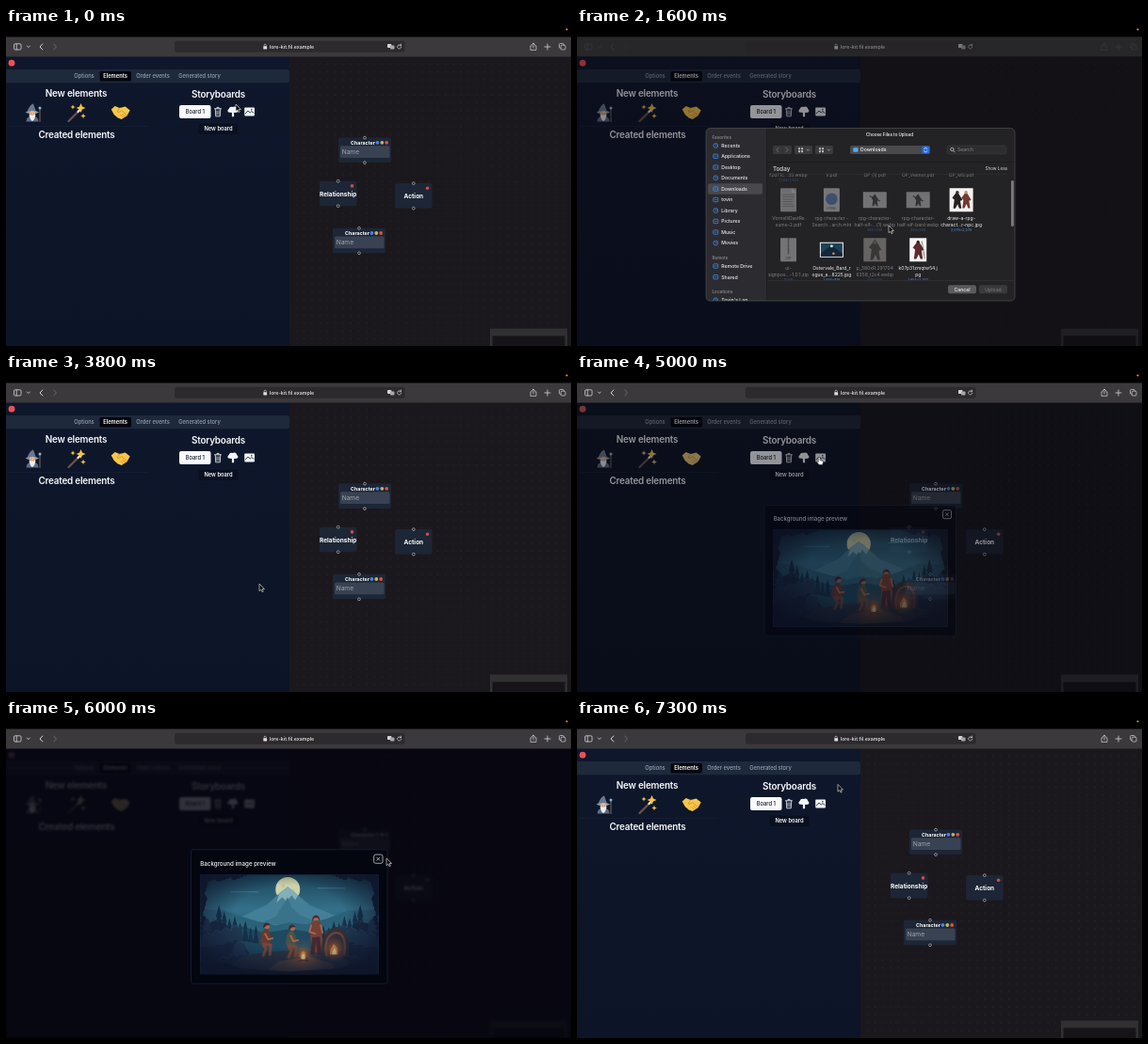
Recreate the animation shown at these times as an HTML page. Size 600 px wide and 338 px high, loop 7400 ms.

```html
<!DOCTYPE html>
<html lang="en">
<head>
<meta charset="utf-8">
<title>Story editor</title>
<style>
html,body{margin:0;width:100%;height:100%;overflow:hidden;background:#000}
svg{display:block;width:100vw;height:100vh;font-family:Inter,"Open Sans",sans-serif}
</style>
</head>
<body>
<svg id="stage" viewBox="0 0 600 338" xmlns="http://www.w3.org/2000/svg"></svg>
<script>
const LOOP = 7400, STEP = 100;

// Markup helpers
const rect = (x, y, w, h, fill, rx = 0, more = '') =>
  `<rect x="${x}" y="${y}" width="${w}" height="${h}" fill="${fill}" rx="${rx}" ${more}/>`;
const dot = (x, y, r, fill, more = '') => `<circle cx="${x}" cy="${y}" r="${r}" fill="${fill}" ${more}/>`;
const shape = (d, fill, more = '') => `<path d="${d}" fill="${fill}" ${more}/>`;
const line = (d, color, w = 0.8, more = '') =>
  `<path d="${d}" fill="none" stroke="${color}" stroke-width="${w}" stroke-linecap="round" stroke-linejoin="round" ${more}/>`;
// y is the middle of the capitals
const text = (x, y, s, size, fill = '#fff', weight = 400, anchor = 'middle', more = '') =>
  `<text x="${x}" y="${y + size * 0.36}" font-size="${size}" fill="${fill}" font-weight="${weight}" text-anchor="${anchor}" ${more}>${s}</text>`;
const at = (x, y, body, more = '') => `<g transform="translate(${x} ${y})" ${more}>${body}</g>`;

const defs = `<defs>
  <pattern id="dots" x="304" y="34" width="8.35" height="8.35" patternUnits="userSpaceOnUse">${dot(4, 4, 0.45, '#38343b')}</pattern>
  <linearGradient id="panel" x2="0" y2="1"><stop stop-color="#0e172b"/><stop offset="1" stop-color="#0c1427"/></linearGradient>
  <linearGradient id="sky" x2="0" y2="1"><stop stop-color="#1c4459"/><stop offset=".35" stop-color="#34708a"/><stop offset=".7" stop-color="#24566c"/></linearGradient>
  <radialGradient id="glow"><stop stop-color="#f0933c" stop-opacity=".65"/><stop offset="1" stop-color="#c4622a" stop-opacity="0"/></radialGradient>
  <radialGradient id="edge" cy=".42" r=".62"><stop offset=".5" stop-color="#0d1529" stop-opacity="0"/><stop offset="1" stop-color="#0d1529" stop-opacity=".85"/></radialGradient>
  <clipPath id="below"><rect y="30" width="600" height="308"/></clipPath>
  <clipPath id="sheetClip"><rect x="137" y="106.5" width="328" height="183.5" rx="4.5"/></clipPath>
  <clipPath id="listClip"><rect x="202" y="154.5" width="258" height="113.5"/></clipPath>
  <clipPath id="artClip"><rect width="189.5" height="106"/></clipPath>
</defs>`;

function toolbar() {
  const c = '#d6d4d6';
  return rect(0, 0, 600, 10, '#000') + rect(0, 9.5, 600, 21, '#3b393b') +
    dot(595.5, 1.5, 1.1, '#e39a2d') +
    `<g id="tools">` + rect(179, 13.8, 244.5, 12, '#2c2a2c', 2.5) +
    rect(8.5, 16.8, 7.5, 6.2, 'none', 1.2, `stroke="${c}" stroke-width=".8"`) + line('M11.2 17v6', c) +
    line('M22.3 19l1.5 1.6 1.5-1.6', c) + line('M38.8 17l-2.8 3 2.8 3', c, 1) +
    line('M50.8 17l2.6 3-2.6 3', '#69676a', 1) +
    line('M558.2 18.8h-1.2v4.6h6v-4.6h-1.2M560 21v-4.8M558.4 17.6l1.6-1.5 1.6 1.5', c, 0.7) +
    line('M575 17v6M572 20h6', c) +
    rect(587.5, 16.5, 4.8, 4.8, 'none', 1, `stroke="${c}" stroke-width=".7"`) +
    rect(589.2, 18.2, 4.8, 4.8, '#3b393b', 1, `stroke="${c}" stroke-width=".7"`) + `</g>` +
    `<g id="address">` + rect(273.3, 19.3, 3.8, 3.3, '#dedede', 0.6) + line('M274.1 19.3v-1a1.1 1.1 0 0 1 2.2 0v1', '#dedede', 0.6) +
    text(279.8, 20.1, 'lore-kit.fil.example', 5.3, '#eeedee', 500, 'start') +
    rect(405, 17, 4.4, 4, '#d4d2d4', 0.8) + rect(408, 18.6, 4.5, 4, '#a9a7aa', 0.8) +
    line('M419.4 18.6a2.1 2.1 0 1 0 .4 1.8M419.6 17v1.8h-1.8', c, 0.7) + `</g>`;
}

const wizard = shape('M-5.5-1C-4-6-1-9 1-9.5L4-1z', '#687890') + shape('M-7.5-.2C-5-3 5-3 7-.2L4 1h-8z', '#8796aa') +
  dot(0, 1.5, 3.2, '#e9b98f') + shape('M-6.5 9.5C-6 4-3 4 0 4s6 0 6.5 5.5z', '#5c6d89') +
  shape('M-3.4 2C-2 3 2 3 3.4 2C3.2 5 2 8 0 9C-2 8-3.2 5-3.4 2z', '#eceef0') +
  line('M8-4V9.5', '#8a6848', 1) + dot(8, -5, 1.5, '#8cb6d9') + dot(-1.2, 1, 0.4, '#333') + dot(1.2, 1, 0.4, '#333');
const spark = (x, y, r) => at(x, y, shape(`M0-${r}L${r * 0.3}-${r * 0.3} ${r} 0 ${r * 0.3} ${r * 0.3} 0 ${r}-${r * 0.3} ${r * 0.3}-${r} 0-${r * 0.3}-${r * 0.3}z`, '#f6c343'));
const wand = line('M-8.5 9L3.5-3', '#6e5148', 2.3) + line('M1.5-1L4-3.5', '#efe6dc', 2.3) +
  spark(4.5, -5, 5) + spark(-4, -6, 2.6) + spark(7, 3.5, 2.8);
const shake = shape('M-10-3L-6-6.5-1-4.5 5-6 10-2 7 3.5 1 7.5-3 6-7 2.5z', '#f6c64b') +
  line('M-1-4.5L-3.5-.5c1.8 1 3.3 0 4.5-1.4L7 3.5M3 6l-3-3M5 4.8L2 1.8', '#c88f28', 0.8);

const handles = h => [0, h].map(y => dot(0, y, 1.4, '#111', 'stroke="#d8d8dc" stroke-width=".6"')).join('');
const character = (x, y) => at(x, y, rect(-28, 0, 56, 26.5, '#1d2636', 2) +
  text(-2, 5, 'Character', 5.3, '#fff', 700) +
  ['#3f86ee', '#c3b465', '#db543f'].map((c, i) => dot(13.4 + i * 4.9, 5.2, 1.9, c)).join('') +
  rect(-26, 8.6, 52.5, 12.8, '#384252', 1.5) + text(-24.3, 15, 'Name', 6.6, '#a0a6b0', 400, 'start') + handles(26.5));
const plainNode = (x, y, name) => at(x, y, rect(-19.7, 0, 39.4, 26.5, '#1d2636', 2.5) + dot(14.8, 5.2, 1.8, '#cf4d44') +
  text(0, 13.6, name, 6.5, '#fff', 700) + handles(26.5));

function page() {
  const head = (x, y, s) => text(x, y, s, 9.9, '#f8fafc', 600, 'middle', 'letter-spacing="-.2"');
  const tab = (x, s) => text(x, 51.2, s, 5.75, '#94a3b8', 500);
  return rect(0, 30, 301, 308, 'url(#panel)') + rect(301, 30, 299, 308, '#1b181d') + rect(301, 30, 299, 308, 'url(#dots)') +
    dot(6, 37.2, 3.4, '#ee5055') +
    rect(-3, 44, 304, 14.3, '#1e293b', 2.5) + rect(99.5, 46, 33.5, 10.6, '#02050d', 1.5) +
    tab(83, 'Options') + text(116, 51.2, 'Elements', 5.75, '#fff', 600) + tab(156, 'Order events') + tab(205.5, 'Generated story') +
    head(74.5, 69, 'New elements') + head(225.5, 70.3, 'Storyboards') + head(75, 113.3, 'Created elements') +
    at(28, 90, wizard) + at(75, 90, wand) + at(121.7, 89.5, shake) +
    rect(3, 104.3, 147, 0.5, '#1a2438') +
    rect(184, 82, 33.5, 14, '#f8fafc', 2) + text(200.8, 89, 'Board 1', 5.75, '#111827', 500) +
    line('M221.5 85.8h7M224 85.6v-1.2h2v1.2M222.3 86l.4 7.8h4.6l.4-7.8M224 88v4M226 88v4', '#f1f5f9', 0.8) +
    shape('M236 89.5a2.2 2.2 0 0 1 .7-3.5a3 3 0 0 1 4-2a3 3 0 0 1 4.6 2.2a2 2 0 0 1 0 3.6l-3.2.3v4.2h-2.2v-4.2z', '#f1f5f9') +
    rect(253.2, 84.6, 10.8, 8.8, '#f1f5f9', 0.8) + line('M254.2 91l2.8-3 2.2 2 1.6-1.4 2.3 1.6', '#1e293b', 0.9) + dot(260.8, 86.8, 0.8, '#1e293b') +
    rect(204, 101, 43, 12.4, '#0a1020', 2, 'stroke="#131d31" stroke-width=".5"') + text(225.5, 107.2, 'New board', 5.75, '#f8fafc', 600) +
    character(381, 116.6) + character(375, 212.8) + plainNode(352.7, 162.7, 'Relationship') + plainNode(432.8, 165.1, 'Action') +
    rect(514, 319.5, 82, 18.5, '#303033') + rect(516.5, 327.3, 77, 10.7, '#161418');
}

// File icons, centred on 0,0
const sheetIcon = rect(-8.5, -12.5, 17, 25, '#c9c9cb', 1) + shape('M3.5-12.5l5 5h-5z', '#f2f2f4') +
  [-6, -3.5, -1, 1.5, 4, 6.5].map(y => rect(-6, y, 12 - Math.abs(y) % 3, 0.8, '#8c8c90')).join('');
const bookIcon = sheetIcon + rect(-8.5, -12.5, 1.6, 25, '#77777c');
const webIcon = rect(-8.5, -12.5, 17, 25, '#dcdce0', 1) + dot(0, -1, 6.3, '#5b86c6') + text(0, 9, 'HTML', 3.6, '#777', 600);
const zipIcon = rect(-8.5, -12.5, 17, 25, '#d4d4d7', 1) + line('M0-12V4', '#77777b', 1.6, 'stroke-dasharray="1 1.6"') + text(0, 9, 'ZIP', 3.8, '#777', 600);
const figure = (x, c, s = 1) => at(x, 0, shape(`M0-${8 * s}l${2 * s} ${3 * s} ${3 * s} ${5 * s}-${2 * s} 1 ${s} ${7 * s}h-${2 * s}l-${1.5 * s}-${4 * s}-${2 * s} ${4 * s}h-${2 * s}l${s}-${8 * s}-${2 * s}-2 ${3 * s}-${4 * s}z`, c));
const portrait = rect(-12.5, -12.5, 25, 25, '#d8d8d8') + rect(-11.5, -11.5, 23, 23, '#7b5b41') + dot(0, -3, 5, '#be8d64') + shape('M-9 11.5C-8 3 8 3 9 11.5z', '#47372f') + shape('M-6-4C-5-11 5-11 6-4L3-6h-6z', '#523324');
const wide = rect(-12.5, -8.5, 25, 17, '#d2d2d4') + figure(0, '#444', 0.8) + line('M-5-4l10 5', '#444', 1.2);
const cast = rect(-12.5, -12.5, 25, 25, '#f5f3f1') + figure(-4.5, '#262022', 1.15) + figure(5, '#713a30', 1.1) + dot(-4.2, -8, 1.8, '#40302c') + dot(5, -8, 1.7, '#c28868');
const statue = rect(-12, -12.5, 24, 25, '#b9b4ae') + figure(0, '#56514e', 1.4) + dot(0, -8, 2.2, '#837c76');
const rogue = rect(-9, -12.5, 18, 25, '#f6f5f4') + figure(0, '#5b2a2c', 1.25) + dot(0, -8.5, 1.6, '#392124') + line('M4-9L7 9', '#555', 0.7);
const camp = rect(-12.5, -8, 25, 16, '#f4f4f4') + rect(-11.5, -7, 23, 14, '#1d4257') + shape('M-11.5 4L-4-2 0-5 5-1 11.5 4V7h-23z', '#12263b') + dot(0, -4, 1.6, '#c7d4bd') + dot(2, 4, 1.3, '#e08a3a');

const FILES = [
  [portrait, '4e7b1d903c5826', 'f2d71c...35.webp', '1,024×1,024'], [sheetIcon, 'TovinMarwell_C', 'V.pdf'],
  [bookIcon, 'TovinMarwell_S', 'OP (1).pdf'], [bookIcon, 'TovinMarwell_S', 'OP_Velmor.pdf'], [bookIcon, 'TovinMarwell_S', 'OP_MS.pdf'],
  [sheetIcon, 'VornelliDastRe', 'sume-2.pdf'], [webIcon, 'rpg character -', 'Search...arch.mht'],
  [wide, 'rpg-character-', 'half-elf-...(1).webp', '960×539'], [wide, 'rpg-character-', 'half-elf-bard.webp', '960×539'],
  [cast, 'draw-a-rpg-', 'charact...r-npc.jpg', '2,576×2,576', 1],
  [zipIcon, 'ui-', 'signpos...-1.0.1.zip', '51 KB'], [camp, 'Ostervale_Bard_r', 'ogue_a...8225.jpg', '1,456×816', 1],
  [statue, 'p_380xR.291704', '6358_t2c4.webp', '570×570'], [rogue, 'k07p31zmqtw54.j', 'pg', '1,654×2,362', 1]
];
function file([icon, a, b, size, live], i) {
  const picked = i === 11
    ? `<g class="picked">${rect(-15.5, -15, 31, 29, '#4a494c', 2)}${rect(-23, 15.2, 46, 15.4, '#1d58d6', 1.5)}</g>` : '';
  return at(224.5 + i % 5 * 45.9, 175 + Math.floor(i / 5) * 53, picked + icon +
    text(0, 19, a, 5, '#f1f1f2', 400) + text(0, 26.4, b, 5, '#f1f1f2', 400) +
    (size ? text(0, 32.2, size, 3.7, '#4d91de') : ''), live ? '' : 'opacity=".45"');
}

function sheet() {
  const side = [[125, 'Recents'], [136.3, 'Applications'], [148, 'Desktop'], [159.3, 'Documents'], [171, 'Downloads'], [182.5, 'tovin'],
    [194, 'Library'], [205.5, 'Pictures'], [217, 'Music'], [228.5, 'Movies'], [253, 'Remote Drive'], [264.7, 'Shared'], [289.3, 'Tovin\'s Lap']];
  const group = (y, s) => text(143.5, y, s, 4.6, '#858388', 600, 'start');
  const icon = (y, i) => (i % 3 ? rect(144.8, y - 2.2, 5, 4.4, 'none', 0.9, 'stroke="#3f8ff0" stroke-width=".8"') + line(`M146 ${y}h2.5`, '#3f8ff0', 0.6)
    : dot(147.3, y, 2.4, 'none', 'stroke="#3f8ff0" stroke-width=".8"') + line(`M147.3 ${y - 1.2}v1.3h1`, '#3f8ff0', 0.6));
  const drop = x => rect(x, 125, 19, 9, '#3b3a3d', 1.6) + rect(x + 4, 127.3, 2, 2, '#bbb') + rect(x + 7, 127.3, 2, 2, '#bbb') +
    rect(x + 4, 130.2, 2, 2, '#bbb') + rect(x + 7, 130.2, 2, 2, '#bbb') + line(`M${x + 13} 129l1.3 1.4 1.3-1.4`, '#bbb', 0.7);
  return `<g clip-path="url(#sheetClip)">` + rect(137, 106, 328, 185, '#232225') + rect(137, 106, 64.5, 185, '#2c2b2f') +
    rect(201.3, 106, 0.5, 185, '#141315') + rect(139, 165.2, 58, 11.6, '#49484c', 2) +
    group(116, 'Favorites') + group(244, 'Remote') + group(280, 'Locations') +
    side.map(([y, s], i) => icon(y, i) + text(153.3, y, s, 5.15, '#ececee', 500, 'start')).join('') +
    text(332, 113.6, 'Choose Files to Upload', 4.5, '#e6e5e7', 600) +
    rect(208, 125, 20, 9, '#38373a', 1.6) + rect(217.8, 126, 0.4, 7, '#232225') + line('M213.6 127.5l-1.7 2 1.7 2M222.3 127.5l1.7 2-1.7 2', '#77767a', 0.8) +
    drop(231) + drop(253) +
    rect(290, 125, 85, 9, '#4a494d', 1.8) + rect(366.5, 125.6, 7.6, 7.8, '#2c6be0', 1.6) + line('M368.8 128.6l1.5-1.6 1.5 1.6M368.8 130.6l1.5 1.6 1.5-1.6', '#fff', 0.7) +
    rect(293.3, 127.3, 5.2, 4.5, '#55aaf0', 0.8) + text(301, 129.5, 'Downloads', 5.15, '#f0f0f1', 500, 'start') +
    rect(393, 125, 63, 9, '#2d2c2f', 1.8, 'stroke="#3f3e42" stroke-width=".5"') + dot(398.4, 129, 1.7, 'none', 'stroke="#c8c8ca" stroke-width=".8"') +
    line('M399.7 130.4l1.4 1.4', '#c8c8ca') + text(404, 129.5, 'Search', 5.15, '#89888c', 400, 'start') +
    rect(202, 142.2, 263, 0.5, '#151416') +
    `<g clip-path="url(#listClip)"><g id="files">${FILES.map(file).join('')}</g></g>` +
    text(208, 149.3, 'Today', 6.2, '#c9c8cb', 600, 'start') + text(457, 149.3, 'Show Less', 4.6, '#dddce0', 400, 'end') +
    rect(208, 155, 249, 0.4, '#39383c') +
    `<g id="thumb">${rect(461, 144, 2.8, 49, '#7b7a7e', 1.4)}</g>` +
    rect(202, 268, 263, 0.5, '#39383c') + rect(394, 273.2, 30, 9, '#5b5a5e', 2) + text(409, 277.7, 'Cancel', 5.15, '#f4f4f5', 500) +
    rect(427, 273.2, 30, 9, '#3a393d', 2) + text(442, 277.7, 'Upload', 5.15, '#77767a', 500) +
    `<g class="picked">${rect(427, 273.2, 30, 9, '#2b66e2', 2)}${text(442, 277.7, 'Upload', 5.15, '#fff', 500)}</g></g>` +
    rect(137, 106.5, 328, 183.5, 'none', 4.5, 'stroke="#59585c" stroke-width=".6"');
}

function art() {
  const pine = (x, y, h) => shape(`M${x} ${y - h}l${h * 0.1} ${h * 0.4}-${h * 0.04} 0 ${h * 0.12} ${h * 0.6}h-${h * 0.36}l${h * 0.12}-${h * 0.6}-${h * 0.04} 0z`, '#15314a');
  let trees = '', leaves = '', rocks = '';
  for (let i = 0; i < 8; i++) {
    const h = 34 - i * 2 - i * 13 % 9, x = 20 + i * 5.6;
    trees += pine(x, 66 + i, h) + pine(190 - x, 66 + i, h);
  }
  for (let i = 0; i < 13; i++) {
    const x = i * 4, r = 6.5 - i * 0.4, y = i * 7 % 4;
    for (const [lx, ly] of [[x, y], [189.5 - x, y], [y, x * 1.3], [189.5 - y, x * 1.3]]) leaves += dot(lx, ly, r, '#121d33');
  }
  // Boulders on both banks
  for (let i = 0; i < 12; i++) {
    const x = 4 + i * 17 % 44, y = 52 + i * 23 % 42 + x * 0.15;
    const rock = shape('M-8 8L-6-3-1-8 5-5 8 8z', i % 2 ? '#20385222' : '#203852') + line('M-6-3L-1-8 5-5', '#36536b', 0.6);
    rocks += at(x, y, rock) + at(189.5 - x, y, rock);
  }
  const flame = (x, y, s) => at(x, y, dot(0, -2, 15 * s, 'url(#glow)') +
    shape(`M${-5 * s} 3C${-6 * s}-3-2-4 ${-1 * s} ${-9 * s}C2-5 ${5 * s}-4 ${4 * s} 3z`, '#ea8a3c') + shape(`M${-2.5 * s} 3C-3-1 0-2 0 ${-5 * s}C1-2 3-1 ${2.2 * s} 3z`, '#ffe6b0'));
  const skin = '#a9684a', dark = '#422a33';
  const sitter = (x, y, coat) => at(x, y, shape('M-6 3C-6-8-2-11 2-10L5-3 4 6h-9z', coat) + line('M-3 6L5 7 4 17M-3 7l3 4-3 7', '#7b4636', 3) +
    line('M-1-5l3 6 5-1', skin, 1.8) + dot(1, -13, 2.8, skin) + shape('M-3-11C-4-18 4-18 4-14L1-14z', dark));
  const stander = at(123, 61, shape('M-6 6L-5-10C-2-13 3-13 5-10L7 8 5 22h-9z', '#744034') + shape('M-4 6l8-1 2 19h-4L0 11-2 24h-4z', dark) +
    dot(0, -15, 3, skin) + shape('M-4-11C-5-20 5-20 4-11L2-15h-4z', dark) + line('M-5-7L-7 0-1 2M5-7l2 8', skin, 1.8));
  return `<g clip-path="url(#artClip)">` + rect(0, 0, 190, 106, 'url(#sky)') +
    rect(32, 18, 30, 1, '#3d7b90', 0.5) + rect(124, 14, 30, 1, '#3d7b90', 0.5) +
    dot(93, 15.8, 13, '#cfd1aa') + dot(88, 12, 2, '#bfc3a0') + dot(98, 18, 2.4, '#bfc3a0') +
    shape('M34 50L56 39 71 32 84 20 93 13 104 22 117 33 135 40 158 50V62H34z', '#437f96') +
    shape('M93 13L104 22 101 27 97 22 92 29 87 24 81 30 84 20z', '#83b0b8') +
    shape('M93 24l4 11 9 8 24 10H60l20-8z', '#397389') +
    shape('M0 37L24 38 42 44 62 50 80 54 95 51 113 53 134 47 158 38 190 38V80H0z', '#2c6279') +
    shape('M0 52L40 54 68 62 95 58 124 62 152 54 190 52V106H0z', '#1e4960') + trees +
    shape('M0 56L18 48 36 60 52 84 36 106H0z', '#182943') + shape('M190 54L168 50 154 62 140 84 160 106H190z', '#182741') + rocks +
    shape('M22 106L44 87 72 82 110 80 150 86 172 106z', '#283444') + shape('M66 106L84 92 116 87 140 95 146 106z', '#4c4245') +
    dot(110, 89, 22, 'url(#glow)', 'opacity=".5"') +
    shape('M130 88C127 70 134 55 145 56s15 15 12 32z', '#33303b') +
    line('M134 86C131 71 137 62 145 62s10 12 8 23', '#6b4437', 2.2) + flame(142.5, 82, 0.9) +
    sitter(70, 68, '#68392f') + sitter(97, 70, '#4b5148') + stander +
    line('M105 92l9-3M105 89l9 3', '#563126', 1.6) + flame(109.5, 87, 0.6) +
    shape('M0 106V92L14 96 27 94 44 100 95 103 148 100 160 95 174 96 190 91V106z', '#131c30') + leaves +
    rect(0, 0, 190, 106, 'url(#edge)') + '</g>';
}

function modal() {
  return rect(196.5, 137.7, 208.5, 142.5, '#03050f', 2.5, 'stroke="#172238" stroke-width=".8"') +
    text(206.3, 152.8, 'Background image preview', 6.2, '#f3f5f8', 500, 'start') +
    rect(390.7, 143, 9.3, 9.3, '#080b15', 1.8, 'stroke="#c7cad0" stroke-width=".8"') +
    line('M393.8 146.1l3.1 3.1M396.9 146.1l-3.1 3.1', '#e4e6ea', 0.7) + at(206.2, 164.2, art());
}

const stage = document.getElementById('stage');
stage.innerHTML = defs + rect(0, 0, 600, 338, '#000') +
  `<g clip-path="url(#below)"><g id="page">${page()}</g></g>` +
  `<g id="shade">${rect(0, 30, 600, 308, '#04040f', 0, 'opacity=".82"')}</g>` + toolbar() +
  `<g id="dim">${rect(0, 30, 600, 308, '#08060c', 0, 'opacity=".42"')}${rect(0, 9.5, 600, 21, '#0c0a0d', 0, 'opacity=".4"')}</g>` +
  `<g id="sheet">${sheet()}</g><g id="modal">${modal()}</g>` +
  `<g id="cursor"><g id="arrow">${shape('M0 0V7.6L1.8 6 3 8.6 4.3 8 3.1 5.5H5.5z', '#050505', 'stroke="#f4f4f4" stroke-width=".6"')}</g>` +
  `<g id="hand">${shape('M-.5 0C.4-.5 1 0 1 .8V3.2L3.8 4C4.4 4.3 4.5 5 4.3 5.8L3.7 8H0L-2.2 5.2C-2.2 4.3-1.3 4.3-.7 5V.8z', '#fff', 'stroke="#111" stroke-width=".5"')}</g></g>`;
const el = id => document.getElementById(id);
const picked = stage.querySelectorAll('.picked');

// Motion helpers
const ramp = (t, a, b) => Math.max(0, Math.min(1, (t - a) / (b - a)));
const ease = p => p * p * (3 - 2 * p);
const within = (t, a, b) => t >= a && t < b;
const PATH = [[0, 244, 81], [200, 256, 88], [500, 256, 88], [900, 331, 210], [1600, 331, 210], [2000, 269, 223], [3800, 269, 223],
  [4200, 251, 79.5], [4300, 251, 77], [4400, 251, 77], [4700, 257, 88.5], [5100, 257, 88.5], [5700, 404, 147], [6000, 404, 147],
  [6200, 395, 148], [6500, 395, 148], [7300, 277, 68.5], [LOOP, 277, 68.5]];
function pointer(t) {
  const i = PATH.findIndex(k => k[0] > t);
  const [t0, x0, y0] = PATH[i - 1], [t1, x1, y1] = PATH[i];
  const p = ease(ramp(t, t0, t1));
  return [x0 + (x1 - x0) * p, y0 + (y1 - y0) * p];
}
const fade = (id, v) => {
  el(id).style.opacity = v;
  el(id).style.display = v > 0 ? '' : 'none';
};

function draw(t) {
  const open = ramp(t, 400, 700) * (1 - ramp(t, 3400, 3700));
  fade('dim', open);
  fade('sheet', open);
  el('tools').style.opacity = 1 - 0.82 * open;
  el('address').style.opacity = 1 - 0.1 * open;

  const scroll = 50.5 * ease(ramp(t, 1200, 1700));
  el('files').setAttribute('transform', `translate(0 ${-scroll})`);
  el('thumb').setAttribute('transform', `translate(0 ${scroll * 0.4})`);
  fade('thumb', 1 - ramp(t, 2400, 2700));
  picked.forEach(g => g.style.display = t >= 2200 ? '' : 'none');

  const view = ramp(t, 4900, 5100) * (1 - ramp(t, 6200, 6400));
  fade('shade', view);
  fade('modal', view);
  el('modal').setAttribute('transform', `translate(300.7 209) scale(${0.95 + 0.05 * view}) translate(-300.7 -209)`);
  el('page').style.filter = view > 0 ? `blur(${1.3 * view}px) saturate(${1 - 0.55 * view})` : 'none';

  const [x, y] = pointer(t);
  const hand = within(t, 200, 600) || within(t, 4700, 5200) || within(t, 6200, 6400);
  el('cursor').setAttribute('transform', `translate(${x} ${y})`);
  el('hand').style.display = hand ? '' : 'none';
  el('arrow').style.display = hand ? 'none' : '';
}

const start = performance.now();
let last = -1;
function tick() {
  const t = Math.floor((performance.now() - start) % LOOP / STEP) * STEP;
  if (t !== last) draw(last = t);
  requestAnimationFrame(tick);
}
tick();
</script>
</body>
</html>
```
